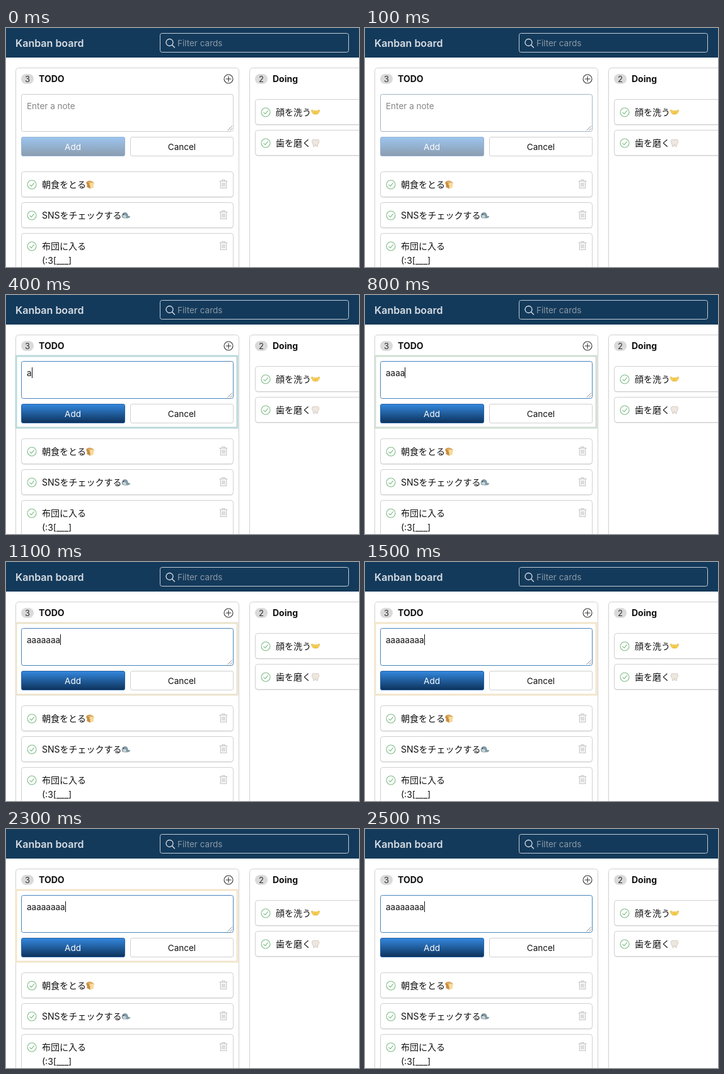
Recreate the animation shown at these times as an HTML page. Size 560 by 380 pixels, loop 2800 ms.

```html
<!DOCTYPE html>
<html lang="ja">
<head>
<meta charset="utf-8">
<title>Kanban board</title>
<style>
html, body { margin: 0; width: 100%; height: 100%; overflow: hidden; background: #fff; }
svg { display: block; }
text { font: 13.5px Inter, "Noto Sans CJK JP", sans-serif; fill: #111; white-space: pre; }
.title { font-size: 16px; font-weight: 600; fill: #d9dfe5; }
.head { font-size: 14px; font-weight: 700; }
.card { font-size: 14px; }
.mid { text-anchor: middle; }
.box { fill: #fff; stroke: #d0d0d0; }
.line { fill: none; stroke-linecap: round; stroke-linejoin: round; }
</style>
</head>
<body>
<svg width="560" height="380" viewBox="0 0 560 380">
  <defs>
    <linearGradient id="blue" x2="0" y2="1">
      <stop stop-color="#3488df"/><stop offset="1" stop-color="#0d325a"/>
    </linearGradient>
    <g id="check" class="line" stroke="#7dbb86" stroke-width="1.1">
      <circle r="7"/><path d="M-3.2 .3L-.8 2.7L3.4-2.3"/>
    </g>
    <g id="trash" class="line" stroke="#c2c2c2" stroke-width="1.1">
      <path d="M-6-4.5H6M-2.2-4.5V-6.5H2.2V-4.5M-4.7-4.5V6.5H4.7V-4.5M-2-2V4M0-2V4M2-2V4"/>
    </g>
    <g id="bread">
      <path d="M-6-4Q-3-7 1-6L5-4Q7-2 5.500 0V4L0 6.500L-5 4V0Q-7-2-6-4Z" fill="#c88d42"/>
      <path d="M-1-2Q2-4 5.500-3Q7-1 5.500 0V4L0 6.500V1Q-2 0-1-2Z" fill="#f6dc9c"/>
      <path d="M-5-4L0-5.500L4-4L-1-2Z" fill="#e5b365"/>
    </g>
    <g id="seal">
      <path d="M-6.500 1Q-6-5-1-5Q3-5 4 1L7 1Q7 4 3 4.500H-3Q-6 4-6.500 1Z" fill="#8299a3"/>
      <path d="M-5 0Q-3-2 0 0Q2 3-1 4Q-5 4-5 0Z" fill="#c9d6da"/>
      <circle cx="-3.500" cy="-1.500" r=".9" fill="#28343a"/>
    </g>
    <g id="hands" fill="#f6ce4f" stroke="#d9a632" stroke-width=".5">
      <path d="M0 3Q-4 4-5 1L-7-3L-5-4L-3-2L-1-3L0 0Z"/>
      <path d="M0 3Q4 4 5 1L7-3L5-4L3-2L1-3L0 0Z"/>
    </g>
    <path id="tooth" d="M-5-5Q-2-7 0-5Q3-7 5-5Q7-2 4 2L3 6Q1 6 0 2Q-1 6-3 6L-4 2Q-7-2-5-5Z"
      fill="#eee7df" stroke="#cbbfb5" stroke-width=".7"/>
  </defs>

  <rect width="560" height="47" fill="#143a5b"/>
  <text class="title" x="15" y="30">Kanban board</text>
  <rect x="244.500" y="8.500" width="299" height="30" rx="3" fill="none" stroke="#c3cdd6"/>
  <g class="line" stroke="#dce2e8" stroke-width="1.300">
    <circle cx="259.500" cy="23" r="5.500"/><path d="M263.500 27L267.500 31"/>
  </g>
  <text x="272" y="29" style="fill:#8b98a4">Filter cards</text>

  <rect class="box" x="15.500" y="63.500" width="354" height="340" rx="5"/>
  <rect class="box" x="386.500" y="63.500" width="354" height="340" rx="5"/>
  <g id="heads"></g>
  <g class="line" stroke="#333" stroke-width="1.100">
    <circle cx="353" cy="81" r="7"/><path d="M349 81H357M353 77V85"/>
  </g>

  <rect id="glow" x="16" y="97" width="351" height="114" fill="none" stroke-width="3"/>
  <rect id="area" class="box" x="24.500" y="105.500" width="336" height="59" rx="3"/>
  <path class="line" stroke="#777" stroke-width=".9" d="M352 162.500L358.500 156M356 162.500L358.500 160"/>
  <text id="note" x="33" y="129"></text>
  <rect id="caret" y="115" width="1" height="17" fill="#111"/>
  <g id="add">
    <rect x="24.500" y="173.500" width="164" height="30" rx="2.500" fill="url(#blue)" stroke="#2a66a8"/>
  </g>
  <text class="mid" x="106" y="194" style="fill:#fff">Add</text>
  <rect class="box" x="197.500" y="173.500" width="163" height="30" rx="2.500"/>
  <text class="mid" x="279" y="194">Cancel</text>
  <g id="cards"></g>
</svg>
<script>
const $ = id => document.getElementById(id);

const head = (x, count, name) => `
  <rect x="${x}" y="73" width="20" height="16" rx="8" fill="#dadada"/>
  <text class="mid" x="${x + 10}" y="85.500" style="font-size:13px;fill:#333">${count}</text>
  <text class="head" x="${x + 28}" y="86">${name}</text>`;
$("heads").innerHTML = head(24, 3, "TODO") + head(395, 2, "Doing");

function card(x, y, lines, icon, iconX, height = 40) {
  const rect = (dy, style) =>
    `<rect x="${x + .5}" y="${y + dy}" width="336" height="${height}" rx="4" ${style}/>`;
  return rect(1.5, 'fill="#e4e4e4" stroke="#e9e9e9"') + rect(.5, 'class="box"') +
    `<use href="#check" x="${x + 17}" y="${y + 21}"/>
     <use href="#trash" x="${x + 321}" y="${y + 20}"/>` +
    lines.map((s, i) => `<text class="card" x="${x + 33}" y="${y + 26 + i * 23}">${s}</text>`).join("") +
    (icon ? `<use href="#${icon}" x="${iconX}" y="${y + 21}"/>` : "");
}
$("cards").innerHTML =
  card(24, 228, ["朝食をとる"], "bread", 133.5) +
  card(24, 277, ["SNSをチェックする"], "seal", 190) +
  card(24, 326, ["布団に入る", "(:3[___]"], "", 0, 64) +
  card(395, 113, ["顔を洗う"], "hands", 491) +
  card(395, 162, ["歯を磨く"], "tooth", 491);

const LOOP = 2800, KEYS = [400, 500, 700, 800, 900, 1000, 1100, 1300];
const mix = (a, b, k) => `rgb(${a.map((v, i) => Math.round(v + (b[i] - v) * k))})`;

function draw(now) {
  const t = Math.floor(now % LOOP / 100) * 100;
  const n = KEYS.filter(k => k <= t).length;

  $("note").textContent = n ? "a".repeat(n) : "Enter a note";
  $("note").style.fill = n ? "#111" : "#858585";
  $("add").setAttribute("opacity", n ? 1 : .48);

  $("area").style.stroke = mix([204, 204, 204], [72, 132, 186], Math.min(1, t / 300));
  $("caret").setAttribute("x", Math.round(33 + 7.6 * n));
  $("caret").setAttribute("opacity", t < 200 || (t >= 1800 && t < 2300) ? 0 : 1);

  // render highlight warms from teal to tan with each keystroke
  $("glow").setAttribute("stroke", mix([186, 217, 219], [243, 229, 203], (n - 1) / 7));
  $("glow").setAttribute("opacity", !n || t >= 2500 ? 0 : t >= 2400 ? .5 : 1);
}

const start = performance.now();
function tick() {
  draw(performance.now() - start);
  requestAnimationFrame(tick);
}
tick();
</script>
</body>
</html>
```
